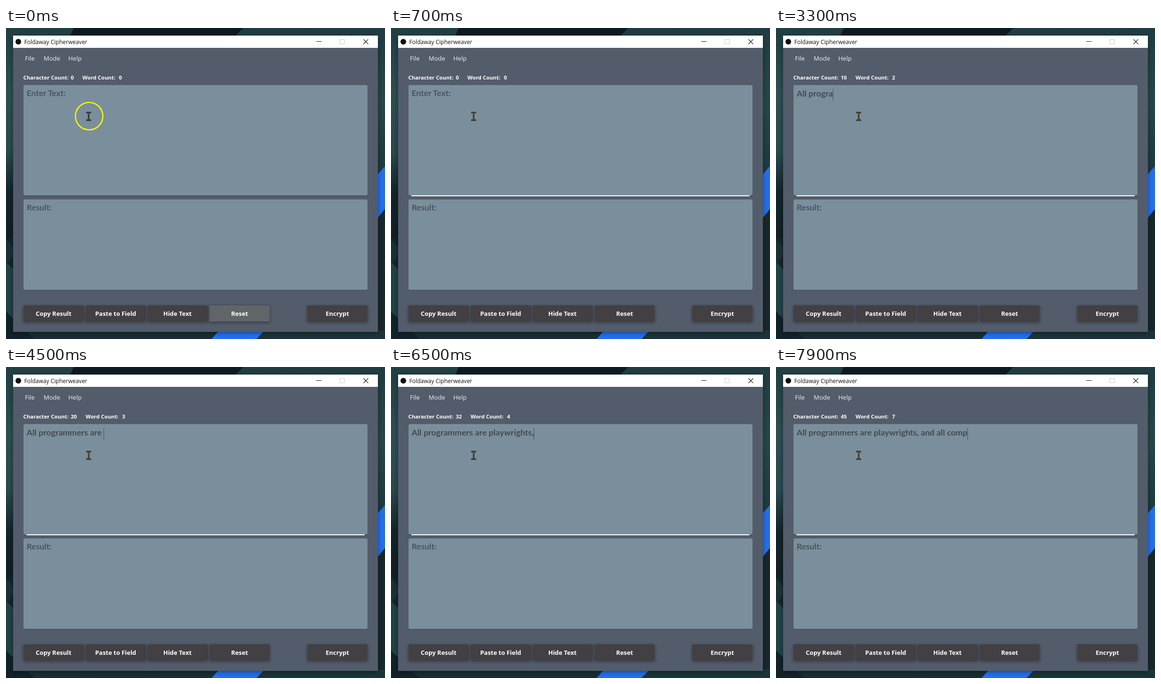
Animation of 800 by 658 pixels, one loop 8000 ms. Source, as an HTML page:

```html
<!DOCTYPE html>
<html lang="en">
<head>
<meta charset="utf-8">
<title>Text encryption</title>
<style>
  html, body { margin: 0; width: 100%; height: 100%; overflow: hidden; background: #14262b; }
  svg { display: block; width: 100vw; height: 100vh; }
  text { font-family: "Open Sans", "Noto Sans", sans-serif; white-space: pre; }
  .title { font-size: 12px; fill: #111; }
  .menu { font-size: 13px; fill: #eef0f3; }
  .count { font-size: 11.25px; font-weight: 700; fill: #fff; }
  .button { font-size: 12.9px; font-weight: 700; fill: #fff; text-anchor: middle; }
  .field { font-family: Lato, "Open Sans", sans-serif; font-size: 17.64px; font-weight: 700; fill: #414a52; }
  .prompt { font-size: 17.4px; fill: #4a555e; }
</style>
</head>
<body>
<svg viewBox="0 0 800 658" preserveAspectRatio="none">
  <defs>
    <linearGradient id="left" x1="0" y1="0" x2="0" y2="1">
      <stop offset="0" stop-color="#203d42"/>
      <stop offset=".3" stop-color="#2c4e52"/>
      <stop offset=".58" stop-color="#294a4e"/>
      <stop offset=".78" stop-color="#12252a"/>
      <stop offset="1" stop-color="#101f24"/>
    </linearGradient>
    <linearGradient id="right" x1="0" y1="0" x2="0" y2="1">
      <stop offset="0" stop-color="#203c42"/>
      <stop offset=".5" stop-color="#25474a"/>
      <stop offset="1" stop-color="#1b383d"/>
    </linearGradient>
    <filter id="soft" x="-10%" y="-40%" width="120%" height="200%">
      <feDropShadow dx="0" dy="2" stdDeviation="3" flood-color="#1c2029" flood-opacity=".6"/>
    </filter>
    <filter id="thin" x="-2%" y="-4%" width="104%" height="108%">
      <feDropShadow dx="0" dy="1" stdDeviation=".6" flood-color="#1f2833" flood-opacity=".75"/>
    </filter>
    <filter id="deep" x="-5%" y="-5%" width="110%" height="110%">
      <feDropShadow dx="0" dy="2" stdDeviation="5" flood-color="#000" flood-opacity=".4"/>
    </filter>
  </defs>

  <g id="wallpaper">
    <rect width="800" height="658" fill="#182e33"/>
    <rect width="60" height="445" fill="url(#left)"/>
    <path d="M0 0H143L136 16H0Z" fill="#223f44"/>
    <path d="M143 0H501L485 16H136Z" fill="#0c1b21"/>
    <path d="M501 0H800V292L780 315V16H485Z" fill="url(#right)"/>
    <path d="M0 445H20V515L0 495Z" fill="#12252a"/>
    <circle cx="-12" cy="473" r="27" fill="#1b3035"/>
    <path d="M0 495L20 515V620L0 600Z" fill="#204246"/>
    <path d="M0 600L60 658H0Z" fill="#11222a"/>
    <path d="M780 315L800 292V383L780 408Z" fill="#236eec"/>
    <path d="M780 408L800 383V640H780Z" fill="#18272c"/>
    <path d="M450 640H546L529 658H434Z" fill="#236eec"/>
    <path d="M546 640H800V658H529Z" fill="#1a3439"/>
  </g>

  <g id="window">
    <rect x="15" y="16" width="770" height="627" fill="#525b6b" filter="url(#deep)"/>
    <rect x="15" y="16" width="770" height="26" fill="#fff"/>
    <circle cx="26" cy="29" r="6" fill="#111"/>
    <text class="title" x="38.5" y="33.5">Foldaway Cipherweaver</text>
    <path d="M655 28.5h11M754.5 24l10 10m0-10l-10 10" fill="none" stroke="#111" stroke-width="1.1"/>
    <rect x="704.5" y="24.5" width="10" height="9" fill="none" stroke="#ccc"/>
    <text class="menu" x="40" y="68.5">File</text>
    <text class="menu" x="79.5" y="68.5">Mode</text>
    <text class="menu" x="131.5" y="68.5">Help</text>
    <text class="count" x="36.5" y="109">Character Count:</text>
    <text class="count" id="chars" x="136.7" y="109">0</text>
    <g id="wordGroup">
      <text class="count" x="161.3" y="109">Word Count:</text>
      <text class="count" id="words" x="238.3" y="109">0</text>
    </g>
    <g fill="#7a8f9b" filter="url(#thin)">
      <rect x="37" y="120.7" width="726" height="233.5" rx="3"/>
      <rect x="37" y="362.7" width="726" height="191.5" rx="3"/>
    </g>
    <text class="field prompt" id="prompt" x="43.5" y="144">Enter Text:</text>
    <text class="field" id="typed" x="43.5" y="145"></text>
    <rect id="caret" y="129" width="1" height="25" fill="#434c54"/>
    <text class="field prompt" x="43.5" y="386">Result:</text>
    <rect id="line" y="354" height="2" fill="#fff"/>
    <g id="buttons"></g>
  </g>

  <circle id="ring" fill="none" stroke-width="2.6"/>
  <g fill="none" stroke-linecap="square">
    <path id="beamEdge" stroke="#111" stroke-width="3"/>
    <path id="beamCore" stroke-width=".8"/>
  </g>
</svg>

<script>
const LOOP = 8000, STEP = 100;
const PHRASE = "All programmers are playwrights, and all comp";
// Moment of each key press, in steps
const KEYS = [
  8, 10, 14, 17, 21, 25, 29, 30, 32, 33, 34, 36, 37, 37, 39,
  41, 42, 43, 44, 45, 47, 49, 50, 52, 54, 55, 57, 58, 59, 61, 62, 64,
  66, 67, 68, 69, 70, 72, 73, 74, 75, 76, 77, 78, 79
];
const BUTTONS = [
  ["Copy Result", 37], ["Paste to Field", 168], ["Hide Text", 298.5],
  ["Reset", 429.5], ["Encrypt", 636]
];
const NS = "http://www.w3.org/2000/svg";
const $ = id => document.getElementById(id);

function set(el, attrs) {
  for (const name in attrs) el.setAttribute(name, attrs[name]);
  return el;
}

function add(parent, tag, attrs) {
  return parent.appendChild(set(document.createElementNS(NS, tag), attrs));
}

const faces = BUTTONS.map(([label, x]) => {
  const face = add($("buttons"), "rect", {
    x, y: 587, width: 127, height: 34, rx: 2, fill: "#424143", filter: "url(#soft)"
  });
  add($("buttons"), "text", { class: "button", x: x + 63.5, y: 609 }).textContent = label;
  return face;
});

const beam = "M171 179h2l1.5 1.5l1.5-1.5h2M174.5 180.5v13M171 195h2l1.5-1.5l1.5 1.5h2";
set($("beamEdge"), { d: beam });
set($("beamCore"), { d: beam });

function drawClick(t) {
  const released = t >= 100;
  const r = 29 - 0.105 * (released ? t - 100 : t);
  set($("ring"), {
    cx: 175.5, cy: 186.5, r: Math.max(r, 0),
    stroke: released ? "#1c55d8" : "#f7f700",
    visibility: t < 400 ? "visible" : "hidden"
  });
  set($("beamCore"), { stroke: released ? "#b09a62" : "#7a8f9b" });

  const fade = Math.min(t / 200, 1);
  const mix = (a, b) => Math.round(a + (b - a) * fade);
  set(faces[3], { fill: `rgb(${mix(98, 66)},${mix(101, 65)},${mix(104, 67)})` });

  const width = 714 * fade;
  set($("line"), { x: 400 - width / 2, width });
}

function drawText(t) {
  const count = KEYS.filter(key => key * STEP <= t).length;
  const text = PHRASE.slice(0, count);
  const idle = count ? t - KEYS[count - 1] * STEP : 0;
  $("typed").textContent = text;
  $("chars").textContent = count;
  $("words").textContent = count ? text.trim().split(" ").length : 0;
  set($("wordGroup"), { transform: `translate(${count > 9 ? 6.7 : 0} 0)` });
  set($("prompt"), { visibility: count ? "hidden" : "visible" });
  set($("caret"), {
    x: Math.round(43.5 + $("typed").getComputedTextLength()),
    visibility: count && idle < 500 ? "visible" : "hidden"
  });
}

function frame() {
  const t = Math.floor((performance.now() % LOOP) / STEP) * STEP;
  drawClick(t);
  drawText(t);
  requestAnimationFrame(frame);
}
frame();
</script>
</body>
</html>
```
